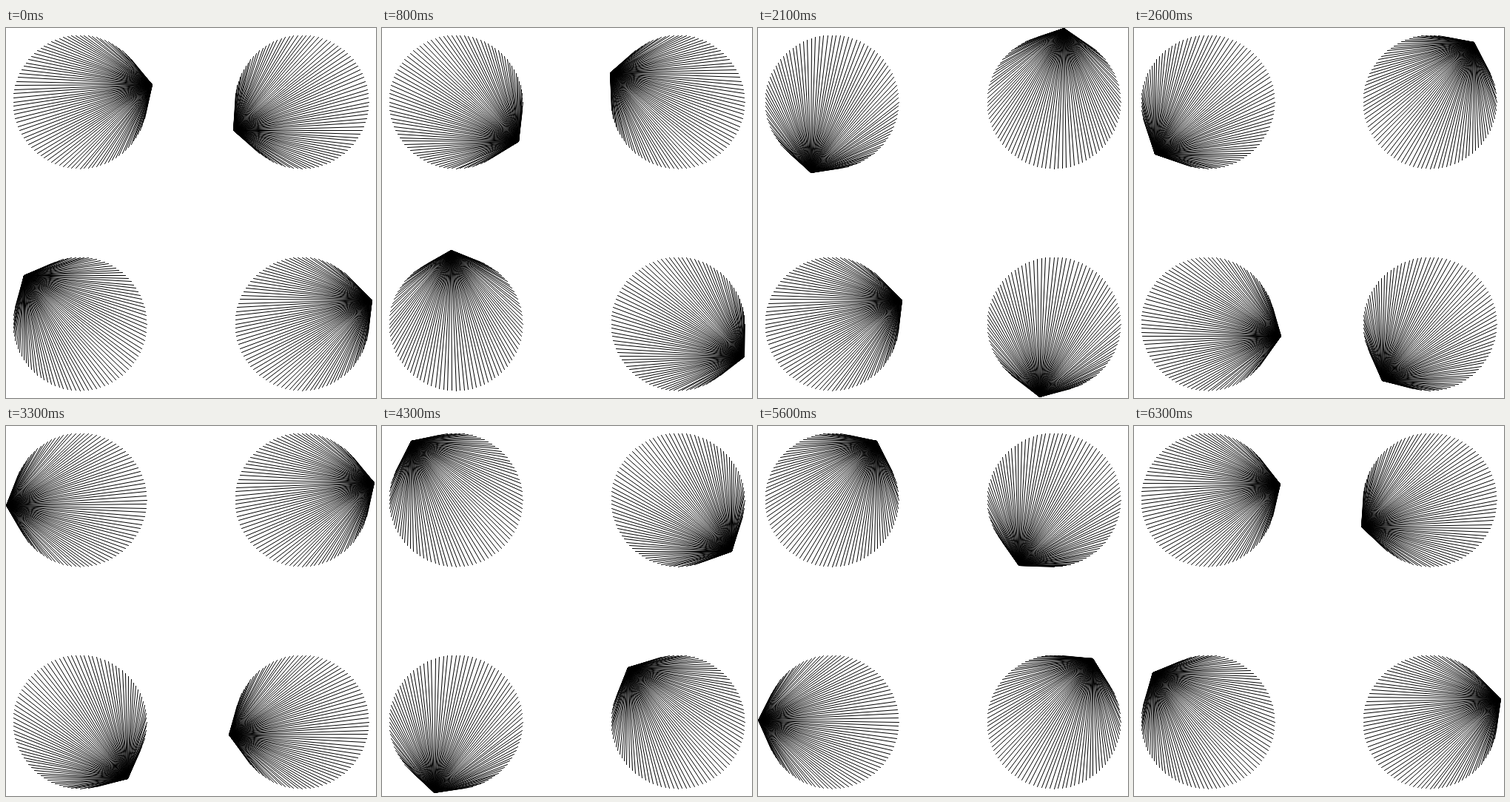
Write an HTML page with a canvas that moves like this. It is 500 px wide and 500 px high and loops after 6.4 s.

```html
<!DOCTYPE html>
<html lang="en">
<head>
<meta charset="utf-8">
<title>Orbiting fans</title>
<style>
html, body { margin: 0; width: 100%; height: 100%; overflow: hidden; background: #fff; }
canvas { display: block; width: 500px; height: 500px; }
</style>
</head>
<body>
<canvas id="stage" width="500" height="500"></canvas>
<script>
const SIZE = 500, STEPS = 64, STEP_MS = 100, RAYS = 100;
const RIM = 90, ORBIT = 100, TURN = 0.1;
const fans = [
  { x: 100, y: 100, phase: -0.236 },
  { x: 400, y: 100, phase: 2.748 },
  { x: 100, y: 400, phase: 3.8505 },
  { x: 400, y: 400, phase: -0.334 }
];

const ctx = document.getElementById('stage').getContext('2d');
ctx.lineWidth = 1;
ctx.lineCap = 'round';
ctx.strokeStyle = '#000';

// Endpoints snap to pixel centres
const snap = v => Math.floor(v + 1e-9) + 0.5;

function onCircle(fan, radius, angle) {
  return [
    snap(fan.x + radius * Math.cos(angle)),
    snap(fan.y + radius * Math.sin(angle))
  ];
}

function line(from, to) {
  ctx.beginPath();
  ctx.moveTo(...from);
  ctx.lineTo(...to);
  ctx.stroke();
}

function draw(step) {
  ctx.clearRect(0, 0, SIZE, SIZE);
  for (const fan of fans) {
    const apex = onCircle(fan, ORBIT, fan.phase + step * TURN);
    for (let i = 0; i < RAYS; i++) {
      line(onCircle(fan, RIM, i / RAYS * 2 * Math.PI), apex);
    }
  }
}

const start = performance.now();
let shown = -1;

function tick() {
  const step = Math.floor((performance.now() - start) / STEP_MS) % STEPS;
  if (step !== shown) draw(shown = step);
  requestAnimationFrame(tick);
}
tick();
</script>
</body>
</html>
```
